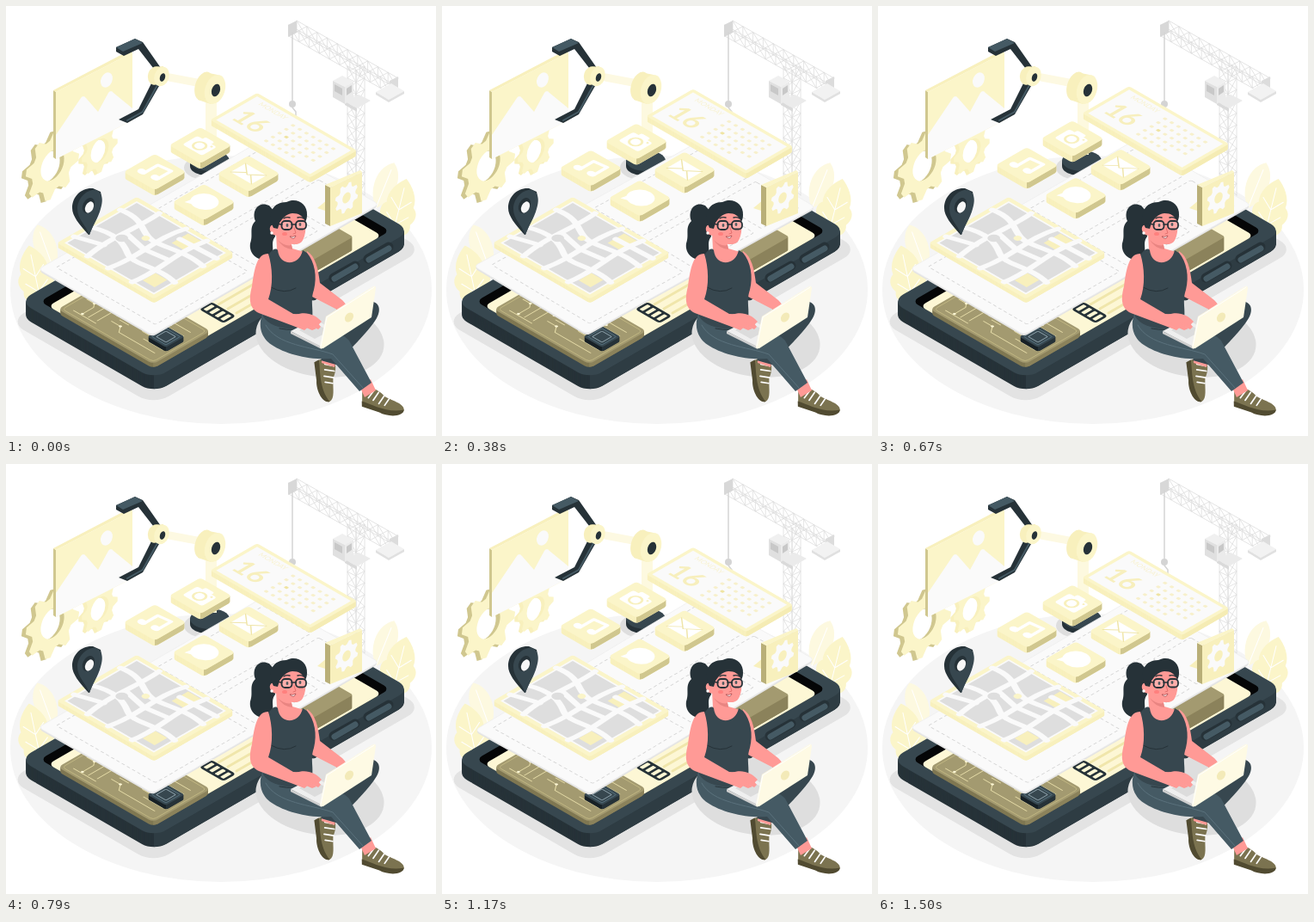
These frames come from a looping animation (500x500 px, 1.54 s). An HTML page:

```html
<!DOCTYPE html>
<html lang="en">
<head>
<meta charset="utf-8">
<style>
html, body { margin: 0; width: 100%; height: 100%; overflow: hidden; background: #fff; }
svg { display: block; width: 100vw; height: 100vh; }
text { font-family: Lato, sans-serif; }
</style>
</head>
<body>
<script>
const CREAM = '#fbf5c9', SIDE = '#d0c78f', EDGE = '#f8f0bd', PAPER = '#fafafa';
const DARK = '#263238', SLATE = '#37474f', JEANS = '#455a64', OLIVE = '#a39a70', SKIN = '#ff9a96';

const path = (d, fill, extra = '') => `<path d="${d}" fill="${fill}" ${extra}/>`;
const line = (d, stroke, width = 1, extra = '') =>
  `<path d="${d}" fill="none" stroke="${stroke}" stroke-width="${width}" stroke-linecap="round" stroke-linejoin="round" ${extra}/>`;
const oval = (x, y, rx, ry, fill, turn = 0) =>
  `<ellipse rx="${rx}" ry="${ry}" fill="${fill}" transform="translate(${x} ${y}) rotate(${turn})"/>`;
const rect = (x, y, w, h, fill, r = 0, extra = '') =>
  `<rect x="${x}" y="${y}" width="${w}" height="${h}" rx="${r}" fill="${fill}" ${extra}/>`;

// Ground plane: x runs right-down, y runs left-down from the top corner.
const iso = (x, y, body) => `<g transform="matrix(.866 .5 -.866 .5 ${x} ${y})">${body}</g>`;

// Rounded plate with an extruded edge.
function slab(x, y, w, h, depth, top, left, right, body = '', r = 3) {
  let edge = '';
  for (let k = depth; k > 0; k--) edge += iso(x, y + k, rect(0, 0, w, h, left, r));
  const bx = x + (w - h) * .866, by = y + (w + h) / 2, rx = x + w * .866, ry = y + w / 2;
  const rim = [[bx, by - r * .3], [bx + r * .87, by - r / 2], [rx - r * .87, ry + r / 2], [rx - r / 2, ry]];
  const low = rim.map(([px, py]) => [px, py + depth]).reverse();
  return edge + `<polygon points="${rim.concat(low).join(' ')}" fill="${right}"/>` +
    iso(x, y, rect(0, 0, w, h, top, r) + body);
}

function gear(radius, hole, teeth) {
  let d = '';
  for (let i = 0; i < teeth * 4; i++) {
    const a = (i - .5) / teeth * Math.PI / 2, r = i % 4 < 2 ? radius : radius * .77;
    d += `${i ? 'L' : 'M'}${(r * Math.cos(a)).toFixed(1)} ${(r * Math.sin(a)).toFixed(1)}`;
  }
  return d + `ZM${hole} 0A${hole} ${hole} 0 1 0 ${-hole} 0A${hole} ${hole} 0 1 0 ${hole} 0Z`;
}

const wheel = (x, y, radius, hole, fill, turn = 0) =>
  path(gear(radius, hole, 8), fill, `fill-rule="evenodd" transform="matrix(.8 -.42 0 1 ${x} ${y}) rotate(${turn})"`);

function truss(x1, y1, x2, y2, dx, dy, n) {
  let d = `M${x1} ${y1}L${x2} ${y2}M${x1 + dx} ${y1 + dy}L${x2 + dx} ${y2 + dy}`;
  for (let i = 0; i < n; i++) {
    const at = k => [x1 + (x2 - x1) * k / n, y1 + (y2 - y1) * k / n];
    const [ax, ay] = at(i), [bx, by] = at(i + 1);
    d += `M${bx + dx} ${by + dy}L${ax} ${ay}l${dx} ${dy}L${bx} ${by}`;
  }
  return line(d, '#dedede', .8);
}

const crane = truss(338, 17, 456, 84, 0, 13, 10) + truss(329, 22, 447, 89, 0, 13, 10) +
  path('M328 22l10-5v14l-10 5Z', '#d8d8d8') +
  path('M446 87l10-5v15l-10 5Z', '#dcdcdc') + path('M430 100l18-10 15 9-18 10Z', '#f2f2f2') +
  path('M430 100l15 9v3l-15-9ZM463 99l-18 10v3l18-10Z', '#e0e0e0') +
  truss(397, 70, 397, 222, 10, 5, 11) + truss(407, 75, 407, 225, 10, -5, 11) +
  path('M394 111l16-8 14 7-16 9Z', '#ebebeb') + path('M394 111l14 8v4l-14-8Z', '#dadada') +
  path('M380 87l11-6 13 7-10 6Z', '#f0f0f0') + path('M380 87l14 7v20l-14-8Z', '#e0e0e0') +
  path('M394 94l10-6v19l-10 7Z', '#ebebeb') + path('M382 91l9 5v8l-9-5Z', '#c8c8c8') + path('M396 96l6-4v8l-6 4Z', '#c8c8c8') +
  line('M333 31V110', '#d4d4d4', 1.5) + oval(333, 114, 4, 4, '#d4d4d4') + line('M333 118l4 5v7', '#d4d4d4', 1.5);

const place = (x, y, turn, body) => `<g transform="translate(${x} ${y}) rotate(${turn})">${body}</g>`;
const leaf = (x, y, turn) => place(x, y, turn,
  path('M0 0C-17-17-17-46 0-57C17-46 17-17 0 0', '#fdf9e0') + line('M0 0V-48', '#fff'));
const frond = (x, y, turn) => place(x, y, turn,
  path('M0 0C-14-2-20-9-17-18C-23-25-22-34-16-38C-18-50-9-62 0-69C9-62 18-50 16-38C22-34 23-25 17-18C20-9 14-2 0 0', CREAM) +
  line('M0 0V-58M-13-26L0-14 13-26M-12-44L0-32 12-44', '#fff'));
const plants = leaf(430, 235, 22) + frond(449, 268, 14) + leaf(56, 308, -20) + frond(41, 346, -12);

const gears = wheel(49, 187, 39, 17, SIDE, 10) + wheel(54, 185, 39, 17, CREAM, 10) +
  wheel(105, 170, 26, 13, EDGE) + wheel(109, 168, 26, 13, CREAM);

const photo = path('M55 98l3 2v78l-3-2Z', SIDE) + path('M55 98l88-46 4 2-89 46Z', EDGE) +
  path('M58 100l89-46v79l-89 45Z', CREAM) +
  path('M58 150L87 107q3-4 6 0l14 16 12-22q3-4 6 0l22 18v14l-89 45Z', PAPER) + oval(117, 86, 6.5, 9, PAPER, 24);

const robot = oval(236, 188, 29, 15, '#dedede') + path('M214 180v6c0 15 46 15 46 0v-6Z', DARK) + oval(237, 180, 23, 12, SLATE) +
  path('M232 105h13v68h-13Z', '#fdf9df') +
  line('M190 83l37 7', '#fdf9e2', 9) +
  path('M128 48l22-10 9 4 21 30-5 5-21-27-17 8-9-5Z', DARK) + path('M128 48l22-10 9 5-23 10Z', JEANS) +
  path('M170 88l8 5-19 33-18 10-10-4 23-12Z', DARK) + line('M176 92l-17 31-18 10', JEANS, 2) +
  oval(174, 81, 9, 11, EDGE, 18) + path('M174 71l9-1 2 21-9 1Z', EDGE) + oval(181, 82, 8.5, 11.5, CREAM, 18) + oval(182, 83, 3, 5, DARK, 18) +
  path('M231 77l15 3-8 34-15-5Z', EDGE) + oval(230, 93, 10, 17, EDGE, 18) + oval(243, 97, 11.5, 17.5, CREAM, 18) +
  oval(244, 98, 4.8, 7.5, DARK, 18);

const phone = iso(317, 186, rect(0, 0, 194, 362, '#e3e3e3', 20)) +
  slab(314, 171, 181, 345, 16, SLATE, DARK, '#2e3c43',
    rect(14, 14, 153, 317, '#050607', 8) + rect(25, 25, 142, 306, '#fdf7d5', 7), 16) +
  line('M381 316l25-14M421 294l24-14', DARK, 11) + line('M382 317l24-14M422 295l23-13', JEANS, 7);

const traces = line('M8 8H50l8 8V32M8 16H42l6 6V44M8 24H32l8 9V64M8 34H24l6 8V66M8 46H18l4 5V66M60 6V12l8 8H94M76 8l8 7h32M60 24h14l6 8h24M56 40h20l7 6h36M50 55h12l6 8h48M54 48h12M88 24h28M92 54h26M12 68h30', '#e9dfaa', .9) +
  [[50, 8], [58, 32], [48, 44], [94, 20], [104, 32], [62, 55], [76, 40], [18, 46], [22, 66]].map(p => oval(...p, 1.6, 1.6, '#fdf7d5')).join('');

const innards = slab(127, 314, 128, 77, 5, OLIVE, '#7f7752', '#8b825b', rect(3, 3, 122, 71, 'none', 4, 'stroke="#c4ba84" stroke-width=".8"') + traces, 6) +
  slab(186, 372, 25, 25, 5, SLATE, '#182126', DARK, rect(6, 6, 13, 13, 'none', 1, 'stroke="#90a4ae"') + rect(3, 3, 19, 19, 'none', 1, 'stroke="#607d8b" stroke-width=".7"')) +
  slab(382, 256, 25, 82, 15, OLIVE, '#81794f', '#8b825b') +
  line('M237 342l66-38M247 347l66-38M258 352l66-38M268 357l40-23', '#f0e6ab', 3) +
  iso(239, 345, rect(-1, -1, 33, 17, DARK, 4) + [2, 9.5, 17, 24.5].map(x => rect(x, 2, 4.5, 11, '#fdf7d5', 1)).join(''));

const dash = 'stroke="#d5d5d5" stroke-width="1" stroke-dasharray="4 3"';
const sheet = `<g id="sheet">${iso(301, 156, rect(0, 0, 153, 304, '#e4e4e4', 5))}${iso(301, 154,
  rect(0, 0, 153, 304, PAPER, 5, 'stroke="#eee" stroke-width=".7"') +
  rect(10, 166, 133, 124, 'none', 2, dash) + rect(10, 12, 64, 142, 'none', 2, dash) +
  rect(84, 72, 59, 82, 'none', 2, dash) + rect(84, 12, 59, 50, 'none', 2, dash))}</g>`;

const roads = 'M4 26C34 20 44 40 62 40S98 30 125 36M4 66C28 56 44 62 60 72S96 66 125 74M34 4C38 30 28 66 36 102M70 4C60 34 72 64 64 102M98 4C90 40 102 70 96 102M4 88L34 78M38 50L66 56 94 52M78 20L125 18';
const map = slab(152, 222, 130, 107, 5, CREAM, EDGE, EDGE,
  rect(5, 5, 120, 97, PAPER) + rect(7, 7, 116, 93, '#dedede') + rect(77, 8, 18, 22, EDGE) + rect(101, 76, 16, 17, EDGE) +
  line(roads, PAPER, 6.5) + oval(38, 58, 6, 6, '#dedede') + oval(54, 42, 4, 4, CREAM));

const pin = path('M96 266C85 254 77 244 77 235C77 221 88 211 101 212l9 4C114 232 103 250 97 266Z', DARK) +
  path('M97 266C92 254 83 247 83 236C83 223 94 213 104 214C113 216 113 227 110 236C107 247 101 255 97 266Z', SLATE) +
  oval(96, 232, 6.5, 9.5, DARK, 26) + oval(97, 234, 4.6, 7, '#f7f7f7', 26);

const bubble = path('M362 235l12-10v14Z', EDGE) +
  path('M371 208l6 3v45l-6-3Z', '#b9af78') + path('M371 208l41-17 2 2-37 18Z', CREAM) +
  path('M377 211l37-18v48l-37 15Z', EDGE) + wheel(396, 223, 17, 6, PAPER, 18);

const tile = (x, y, icon) => slab(x, y - 1, 42, 42, 7, CREAM, EDGE, SIDE, icon, 4);
const tiles =
  tile(226, 142, rect(8, 12, 26, 20, '#fff', 3) + rect(15, 8, 12, 7, '#fff', 2) + oval(21, 22, 7.5, 7.5, EDGE) + oval(21, 22, 5, 5, '#fff') + oval(30, 15, 1.3, 1.3, EDGE)) +
  tile(173, 173, line('M15 29V11L31 9V26', '#fff', 4) + oval(12, 29, 5, 4, '#fff') + oval(28, 27, 5, 4, '#fff')) +
  tile(282, 175, rect(7, 11, 28, 20, '#fff', 1) + line('M7 11l14 12 14-12M7 31l11-10M35 31l-11-10', '#efe5a8', 1.2)) +
  tile(230, 208, oval(21, 20, 14, 13, '#fff') + path('M10 24l-2 10 11-4Z', '#fff'));

let days = '';
for (let i = 0; i < 33; i++)
  days += rect(60 + i % 7 * 9, 12 + Math.floor(i / 7) * 9, 4, 3.5, i === 15 ? '#efe4a2' : '#f7f0cc', 1);
const calendar = slab(292, 101, 134, 63, 6, CREAM, EDGE, '#f5ecb4',
  rect(4, 4, 126, 55, PAPER) +
  `<text x="14" y="13" font-size="8" fill="#f8f2cf">MONDAY</text><text x="11" y="48" font-size="31" font-weight="700" fill="#f7efbd">16</text>` + days);

const shoe = (x, y, turn) => place(x, y, turn,
  path('M-25-7C-19-16-7-13 2-5C13-1 25 0 26 7C26 15 11 15 0 11L-23 8Z', '#7b7350') +
  path('M-24 4C-12 6 8 14 26 7C26 16 8 18-2 14L-23 10Z', '#514b31') +
  line('M-12-10l-5 9M-6-9l-5 10M1-6l-5 10M7-3l-4 8', '#fff', 1.7));

const woman = oval(365, 387, 75, 44, '#dedede', 8) +
  shoe(375, 433, 72) + shoe(438, 459, 8) +
  path('M367 405l17 5-2 10-15-5Z', SKIN) + path('M412 444l12-10 6 13-13 8Z', SKIN) +
  path('M366 412C378 390 389 365 384 350L419 343C434 342 437 352 431 363C420 382 396 400 387 418Z', SLATE) +
  path('M299 356C292 372 297 386 309 394C325 405 354 412 378 410L411 448L425 438L399 389C389 378 372 378 352 370L352 356Z', JEANS) +
  line('M302 371C315 395 355 396 380 405L415 444', '#5a717c', 1) +
  path('M350 285C360 291 363 306 365 322L391 342C400 350 394 356 385 353L354 337C347 322 346 301 350 285Z', SKIN) +
  path('M306 232C294 226 285 238 290 250C282 258 288 266 284 276C282 289 294 298 306 294C315 284 306 277 313 268V240Z', DARK) +
  path('M314 264l17 9 2 9 17 5-15 20-33-13 13-11Z', SKIN) + path('M316 272q8 8 16 6l1 5q-11-1-17-11', '#e98582') +
  path('M306 288C310 283 314 281 316 284C318 303 341 303 345 284L350 287C359 298 362 314 358 330C353 345 359 352 355 372C335 379 307 375 299 361C304 342 306 330 303 316Z', SLATE) +
  line('M308 327q16 9 29 1M318 375q18 4 35-3', DARK, 1) +
  path('M315 241L346 238C350 252 349 268 344 274C339 280 324 277 315 267C305 267 304 252 313 255Z', SKIN) +
  path('M311 258C303 240 311 228 326 228C338 222 351 230 350 243C350 247 349 249 348 251C345 244 341 241 333 241C325 242 321 248 318 252L316 259Z', DARK) +
  oval(309, 264, 1.7, 1.7, '#fff') + oval(327, 255, 1.4, 2, DARK) + oval(342, 254, 1.4, 2, DARK) +
  rect(320.5, 250, 12, 10, '#ffffff33', 4, 'stroke="#263238" stroke-width="1.8"') + rect(337, 250, 12, 9.5, '#ffffff33', 4, 'stroke="#263238" stroke-width="1.8"') +
  line('M332 254h5M312 253l9 1', DARK, 1.6) + line('M323 247q3-2 7-1M339 246q4-1 7 1', DARK, 1.3) +
  line('M335 258l2 6-3 1', '#e3716f', 1) + path('M330 268q4 1 7-1-2 6-7 1', '#fff', 'stroke="#a8474a" stroke-width=".8"') +
  oval(324, 265, 3, 2, '#ff807e') +
  path('M331 378l28-14 31 18-23 15Z', '#efefef') + path('M331 378l36 18v3l-36-18Z', '#cfcfcf') + path('M341 377l17-9 18 10-17 9Z', '#dcdcdc') +
  path('M305 288C292 288 289 304 286 326C282 341 283 352 294 357L334 372L347 377L354 371L363 376L366 373L355 359L334 358L305 341C311 325 310 304 305 288Z', SKIN) +
  path('M337 359C348 355 359 358 367 367L363 371L350 367L361 375L356 377L342 371Z', SKIN) +
  path('M372 361L427 326q3-1 3 2l-5 34L369 398q-4 1-4-2Z', '#fefae4') + line('M366 396l7-34 55-35', '#fff', 1) + oval(399, 362, 4.5, 6, '#f3eab8', 35);

document.body.innerHTML = `<svg viewBox="0 0 500 500">` + oval(250, 330, 245, 156, '#f5f5f5') +
  crane + plants + gears + photo + robot + phone + innards + sheet + map + pin + bubble +
  `<g id="floating">${calendar}${tiles}</g>${woman}</svg>`;

const LOOP = 1540, LIFT = 9;
const sheetNode = document.getElementById('sheet'), floatNode = document.getElementById('floating');

function draw(now) {
  const p = now % LOOP / LOOP;
  const rise = 1 - Math.abs(1 - 2 * p);
  const sway = p < .25 ? 4 * p : p < .75 ? 2 - 4 * p : 4 * p - 4;
  floatNode.setAttribute('transform', `translate(0 ${-LIFT * rise})`);
  sheetNode.setAttribute('transform', `rotate(${sway} 236 268)`);
}

const start = performance.now();
function tick() {
  draw(performance.now() - start);
  requestAnimationFrame(tick);
}
tick();
</script>
</body>
</html>
```
